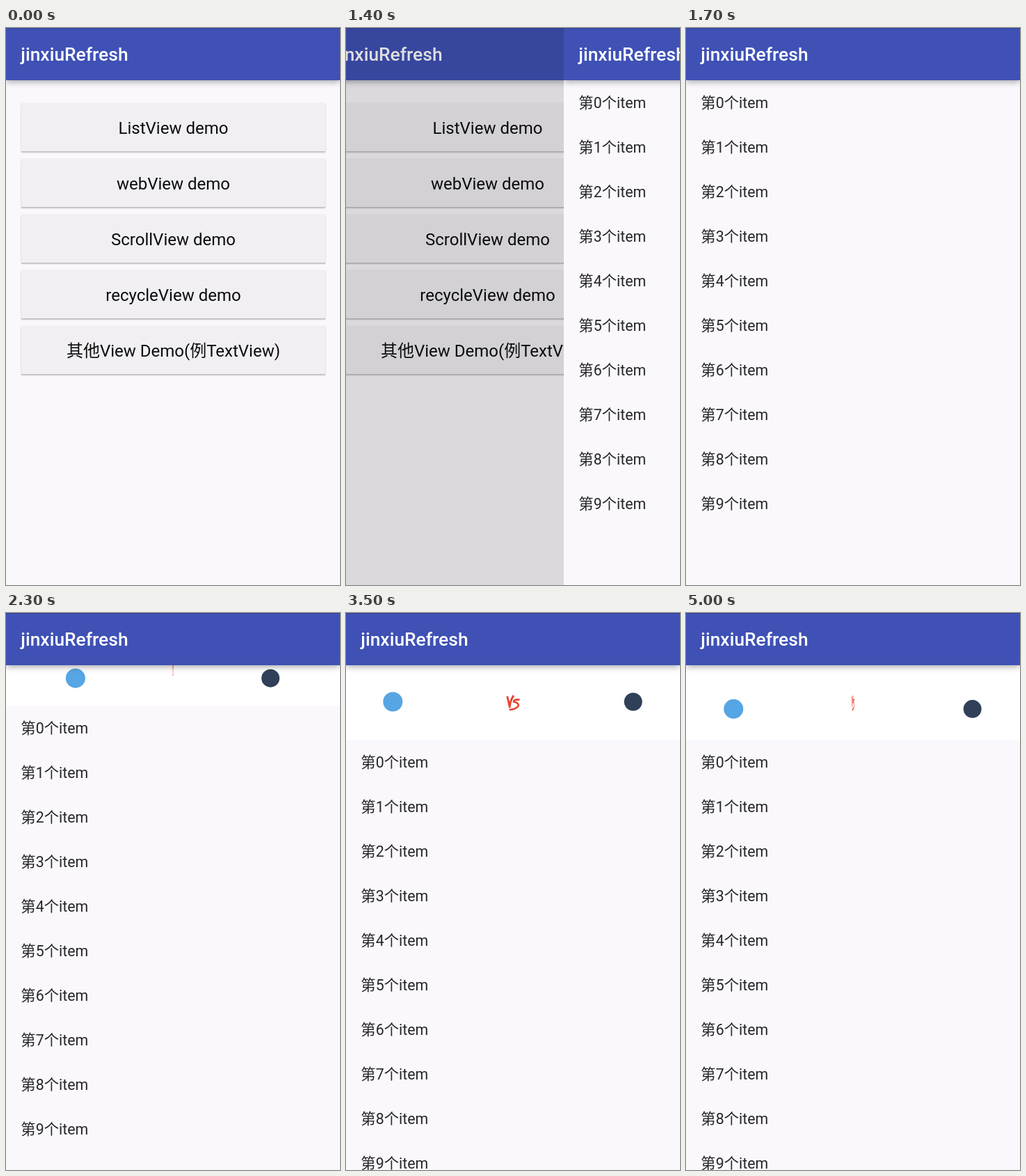
Recreate the animation shown at these times as an HTML page. Size 480 px wide and 800 px high, loop 5.1 s.

```html
<!DOCTYPE html>
<html lang="zh">
<head>
<meta charset="utf-8">
<title>jinxiuRefresh</title>
<style>
  html, body { margin: 0; width: 100%; height: 100%; overflow: hidden; }
  body { position: relative; background: #faf8fc; font-family: Roboto, "Noto Sans CJK SC", "Noto Sans CJK", sans-serif; }
  #stage { position: absolute; left: 0; top: 0; width: 480px; height: 800px; overflow: hidden; }
  .page { position: absolute; inset: 0; overflow: hidden; background: #faf8fc; white-space: nowrap; }
  .bar {
    position: absolute; left: 0; top: 0; z-index: 2; box-sizing: border-box;
    width: 100%; height: 74.67px; padding-left: 21.33px;
    background: #3f51b5; color: #fff; font-weight: 500; font-size: 26.4px; line-height: 76px;
    box-shadow: inset 0 1px rgba(0, 0, 0, .18), 0 2px 9px rgba(0, 0, 0, .36);
  }
  .button {
    position: absolute; left: 22px; width: 437px; height: 69px;
    background: #f1eff3; color: #0c0c0c; font-size: 24px; line-height: 73px; text-align: center;
    box-shadow: 0 2px 1.5px rgba(0, 0, 0, .22), 0 0 2px rgba(0, 0, 0, .08);
  }
  #shade { position: absolute; inset: 0; z-index: 3; background: #000; opacity: 0; }
  #list { position: absolute; left: 0; top: 75px; width: 100%; }
  .row { height: 64px; padding-left: 21.33px; color: #262529; font-size: 21.33px; line-height: 65px; }
  #header { position: absolute; left: 0; top: -107px; width: 480px; height: 107px; background: #fff; }
</style>
</head>
<body>
<div id="stage">
  <div class="page" id="menu">
    <div class="bar">jinxiuRefresh</div>
    <div id="shade"></div>
  </div>
  <div class="page" id="detail">
    <div class="bar">jinxiuRefresh</div>
    <div id="list">
      <svg id="header" viewBox="0 0 480 107">
        <circle id="blue" r="14" fill="#56a5e4"/>
        <circle id="dark" r="13" fill="#2f4058"/>
        <g id="versus" fill="none" stroke="#e8432f" stroke-linejoin="round">
          <path d="M-8.5-9.5L-5 6Q-4-4 1-10.5" stroke-width="2.9"/>
          <path d="M10-4.5Q1-5.5 1-1.5Q9 0 8 4.5Q4 9.5-5.5 10" stroke-width="2.7"/>
        </g>
      </svg>
    </div>
  </div>
</div>
<script>
const LOOP = 5100, STEP = 100;
const $ = id => document.getElementById(id);

function add(parent, className, text) {
  const el = document.createElement('div');
  el.className = className;
  el.textContent = text;
  parent.append(el);
  return el;
}

['ListView demo', 'webView demo', 'ScrollView demo', 'recycleView demo', '其他View Demo(例TextView)']
  .forEach((label, i) => { add($('menu'), 'button', label).style.top = 108 + 80 * i + 'px'; });
for (let i = 0; i < 10; i++) add($('list'), 'row', `第${i}个item`);

const span = (t, start, length) => Math.min(1, Math.max(0, (t - start) / length));
const smooth = u => (1 - Math.cos(Math.PI * u)) / 2;
const decelerate = (u, power) => 1 - (1 - u) ** power;
const mix = (a, b, u) => a + (b - a) * u;

// List offset, orbit angle and flip angle: pull, release, then one eased turn.
function refreshPose(t) {
  if (t <= 2700) {
    const pull = decelerate(span(t, 2100, 600), 1.6);
    return { offset: 122 * pull, orbit: 115 * pull, flip: 180 * pull };
  }
  const settle = decelerate(span(t, 2700, 700), 2);
  const turn = smooth(span(t, 3470, 2000));
  return {
    offset: mix(122, 107, decelerate(span(t, 2700, 300), 2)),
    orbit: mix(115, 200, settle) + 360 * turn,
    flip: mix(180, 375, settle) + 720 * turn
  };
}

function draw(t) {
  const slide = smooth(span(t, 1199, 501));
  $('menu').style.transform = `translateX(${-Math.round(106 * slide)}px)`;
  $('shade').style.opacity = .36 * slide;
  $('detail').style.transform = `translateX(${Math.round(480 * (1 - slide))}px)`;
  $('detail').style.visibility = slide > 0 ? 'visible' : 'hidden';

  const { offset, orbit, flip } = refreshPose(t);
  const angle = orbit * Math.PI / 180;
  const x = 87.5 + 21.5 * Math.cos(angle), y = 57 + 13 * Math.sin(angle);
  $('list').style.transform = `translateY(${Math.round(offset)}px)`;
  $('blue').setAttribute('transform', `translate(${x} ${y})`);
  $('dark').setAttribute('transform', `translate(${480 - x} ${y})`);
  $('versus').setAttribute('transform', `translate(240 54) scale(${Math.cos(flip * Math.PI / 180)} 1)`);
}

function tick() {
  const t = performance.now() % LOOP;
  draw(Math.floor(t / STEP) * STEP);
  requestAnimationFrame(tick);
}
tick();
</script>
</body>
</html>
```
